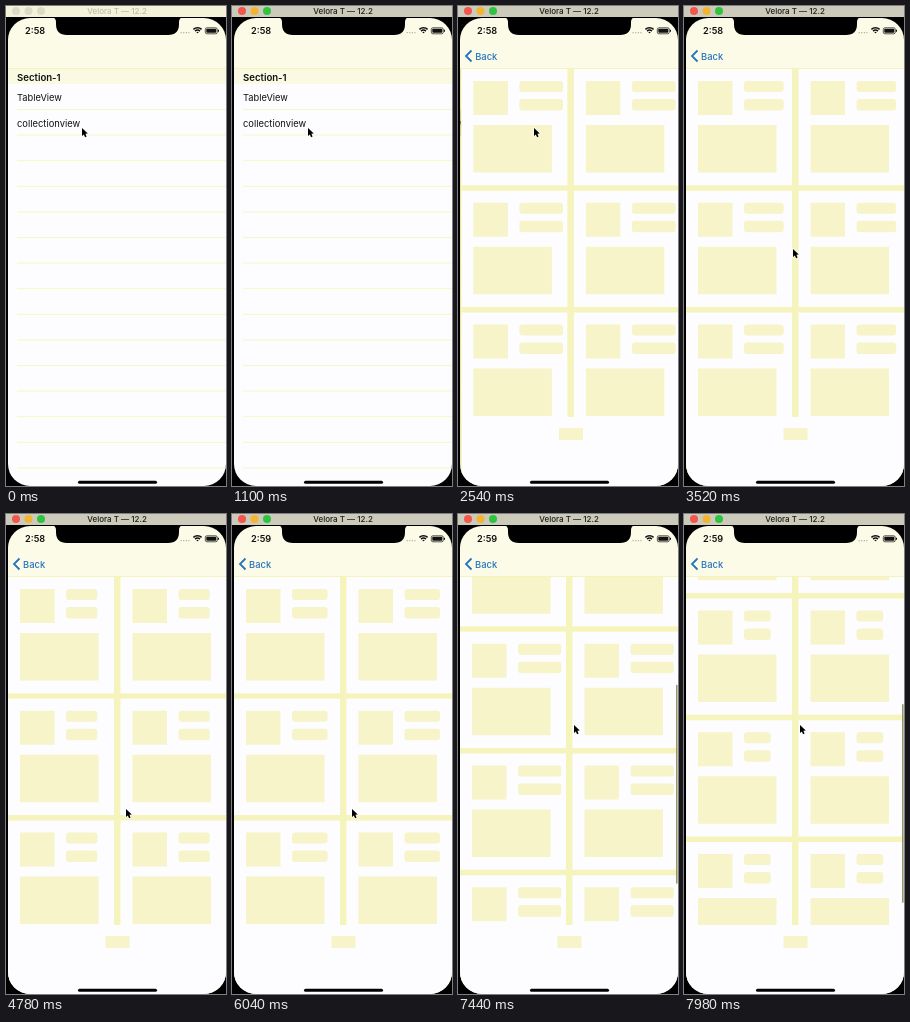
Write an HTML page with a canvas that moves like this. It is 220 px wide and 480 px high and loops after 8 s.

```html
<!DOCTYPE html>
<html lang="en">
<head>
<meta charset="utf-8">
<title>Skeleton list</title>
<style>
  html, body { margin: 0; width: 100%; height: 100%; overflow: hidden; background: #000; }
  canvas { display: block; width: 220px; height: 480px; }
</style>
</head>
<body>
<canvas id="stage"></canvas>
<script>
const W = 220, H = 480, LOOP = 8000;
const PAGE = '#fdfdff', BONE = '#f6f4c8', GAP = '#f6f4bd', BAR = '#fbfbe8', LINE = '#f5f3b8';
const SANS = 'Inter, "Liberation Sans", sans-serif';
const SCREEN = { x: 2, y: 12, w: 218, h: 468, r: 22 };
const NAV_BOTTOM = 63, GRID_BOTTOM = 411, ROW = 121.7, ROWS = 5, TABLE_ROW = 25.6;

const FOCUS = 200, PRESS = 1300, PUSH = 1421, RELOAD = 2161, MINUTE = 5000;
const DRAG = 6440, RELEASE = 6880, DRAG_LENGTH = 84, FLICK = 155;

const canvas = document.getElementById('stage');
const ctx = canvas.getContext('2d');
const scale = window.devicePixelRatio || 1;
canvas.width = W * scale;
canvas.height = H * scale;

const clamp = v => Math.max(0, Math.min(1, v));
const span = (t, a, b) => clamp((t - a) / (b - a));
const smooth = v => v * v * (3 - 2 * v);

function box(x, y, w, h, color, r = 0) {
  ctx.fillStyle = color;
  ctx.beginPath();
  ctx.roundRect(x, y, w, h, r);
  ctx.fill();
}

function text(str, x, y, size, color = '#111', weight = 400, align = 'left') {
  ctx.font = `${weight} ${size}px ${SANS}`;
  ctx.textAlign = align;
  ctx.fillStyle = color;
  ctx.fillText(str, x, y);
}

function clipped(x, y, w, h, r, draw) {
  ctx.save();
  ctx.beginPath();
  ctx.roundRect(x, y, w, h, r);
  ctx.clip();
  draw();
  ctx.restore();
}

// Critically damped spring from 0 to 1
function pushProgress(t) {
  const s = Math.max(0, t - PUSH) * 0.0064;
  return 1 - (1 + s) * Math.exp(-s);
}

function dragProgress(t) {
  return Math.pow(span(t, DRAG, RELEASE), 1.6);
}

function scrollOffset(t) {
  const coast = Math.max(0, t - RELEASE) / 1000;
  return DRAG_LENGTH * dragProgress(t) + FLICK * (1 - Math.exp(-2 * coast));
}

function barWidth(t) {
  const start = t < RELOAD ? 1573 : RELOAD;
  return 34.5 - 9.5 * Math.cos(2 * Math.PI * Math.max(0, t - start) / 820);
}

function cursorPosition(t) {
  const a = smooth(span(t, 2700, 3400));
  const b = smooth(span(t, 3900, 4600));
  const c = dragProgress(t);
  return [76 + 33 * a + 11 * b - 4 * c, 122 + 121 * a + 52 * b - DRAG_LENGTH * c];
}

function drawTitleBar(focused) {
  box(0, 0, W, 11, focused ? '#cbcabb' : '#f4f3da');
  const lights = focused ? ['#f2564d', '#f3b52f', '#2fc440'] : Array(3).fill('#dcdbc8');
  lights.forEach((color, i) => box(6 + 12.5 * i, 1, 8, 8, color, 4));
  text('Velora T — 12.2', 111, 8, 8, focused ? '#1c1c14' : '#bcbbae', 500, 'center');
}

function drawTable(t, p) {
  ctx.save();
  ctx.translate(-0.3 * SCREEN.w * p, 0);
  box(0, NAV_BOTTOM, 300, H, PAGE);
  box(0, NAV_BOTTOM, 300, 15, '#faf9e2');
  for (let i = 0; i < 15; i++) box(11, 103 + TABLE_ROW * i, 289, 1, '#f7f6c6');
  if (t >= PRESS) box(0, 104, 300, TABLE_ROW, '#d2d2d2');
  text('Section-1', 11, 74.5, 9.6, '#111', 600);
  text('TableView', 11, 95, 9.3);
  text('collectionview', 11, 120.5, 9.4);
  ctx.restore();
  box(0, NAV_BOTTOM, W, H, `rgba(208, 200, 50, ${0.44 * p})`);
}

function drawCell(x, y, width) {
  box(x, y, 106, ROW - 5.5, PAGE);
  box(x + 12, y + 12, 34.5, 34, BONE);
  box(x + 58, y + 12, width, 11, BONE, 3);
  box(x + 58, y + 30, width, 11.5, BONE, 3);
  box(x + 12, y + 56, 78.5, 47.5, BONE);
}

function drawGrid(t, p) {
  const offset = scrollOffset(t), width = barWidth(t);
  ctx.save();
  ctx.translate(SCREEN.w * (1 - p), 0);
  if (p < 0.99) box(1, NAV_BOTTOM, 1, H, '#e6e4a8');
  box(2, NAV_BOTTOM, W, H, PAGE);
  clipped(2, NAV_BOTTOM, SCREEN.w, GRID_BOTTOM - NAV_BOTTOM, 0, () => {
    box(2, NAV_BOTTOM, SCREEN.w, H, GAP);
    for (let row = 0; row < ROWS; row++) {
      const y = NAV_BOTTOM + ROW * row - offset;
      drawCell(2, y, width);
      drawCell(114.5, y, width);
    }
    const view = GRID_BOTTOM - NAV_BOTTOM, ratio = view / (ROW * ROWS);
    ctx.globalAlpha = span(t, DRAG, DRAG + 120);
    box(218, NAV_BOTTOM + offset * ratio, 1.6, view * ratio, '#96956c', 0.8);
    ctx.globalAlpha = 1;
  });
  box(99.5, 422, 24, 12, BONE);
  ctx.restore();
}

function drawNavBar(p) {
  box(0, 12, W, NAV_BOTTOM - 12, BAR);
  box(0, 62, W, 1, LINE);
  if (p === 0) return;
  ctx.globalAlpha = Math.min(1, p * p * 1.8);
  ctx.strokeStyle = '#2475bd';
  ctx.lineWidth = 1.8;
  ctx.beginPath();
  ctx.moveTo(13.5, 44.5);
  ctx.lineTo(8, 50);
  ctx.lineTo(13.5, 55.5);
  ctx.stroke();
  text('Back', 17 + 30 * (1 - p), 53.5, 9.4, '#2475bd', 500);
  ctx.globalAlpha = 1;
}

function drawStatus(t) {
  text(t < MINUTE ? '2:58' : '2:59', 19, 28, 9.2, '#111', 600);
  for (let i = 0; i < 4; i++) box(174.5 + 2.6 * i, 26, 1.3, 1.3, '#aaa994', 0.6);
  ctx.strokeStyle = '#111';
  ctx.lineWidth = 1.5;
  for (const r of [1, 3.4, 5.8]) {
    ctx.beginPath();
    ctx.arc(191.5, 27.5, r, -Math.PI * 0.75, -Math.PI * 0.25);
    ctx.stroke();
  }
  ctx.lineWidth = 0.7;
  ctx.beginPath();
  ctx.roundRect(199.3, 21.8, 12, 6, 1.6);
  ctx.stroke();
  box(200.3, 22.8, 10, 4, '#111', 0.8);
  box(212, 23.8, 1, 2, '#111');
}

function drawNotch() {
  ctx.fillStyle = '#000';
  ctx.beginPath();
  ctx.moveTo(46, 11);
  ctx.quadraticCurveTo(50, 12, 50, 16);
  ctx.lineTo(50, 18);
  ctx.quadraticCurveTo(50, 29, 61, 29);
  ctx.lineTo(162, 29);
  ctx.quadraticCurveTo(173, 29, 173, 18);
  ctx.lineTo(173, 16);
  ctx.quadraticCurveTo(173, 12, 177, 11);
  ctx.fill();
}

function drawCursor(x, y) {
  const points = [[0, 0], [0, 8], [1.8, 6.4], [3.1, 9.2], [4.6, 8.5], [3.4, 5.8], [5.8, 5.6]];
  ctx.beginPath();
  points.forEach(([dx, dy]) => ctx.lineTo(x + dx, y + dy));
  ctx.closePath();
  ctx.strokeStyle = '#fff';
  ctx.lineWidth = 1.2;
  ctx.stroke();
  ctx.fillStyle = '#000';
  ctx.fill();
}

function draw(t) {
  const p = pushProgress(t);
  ctx.setTransform(scale, 0, 0, scale, 0, 0);
  box(0, 0, W, H, '#000');
  drawTitleBar(t >= FOCUS);
  clipped(SCREEN.x, SCREEN.y, SCREEN.w, SCREEN.h, SCREEN.r, () => {
    drawTable(t, p);
    if (p > 0) drawGrid(t, p);
    drawNavBar(p);
    drawStatus(t);
    box(72, 474.7, 79, 3, '#000', 1.5);
  });
  drawNotch();
  drawCursor(...cursorPosition(t));
}

function tick() {
  draw(performance.now() % LOOP);
  requestAnimationFrame(tick);
}
tick();
</script>
</body>
</html>
```
